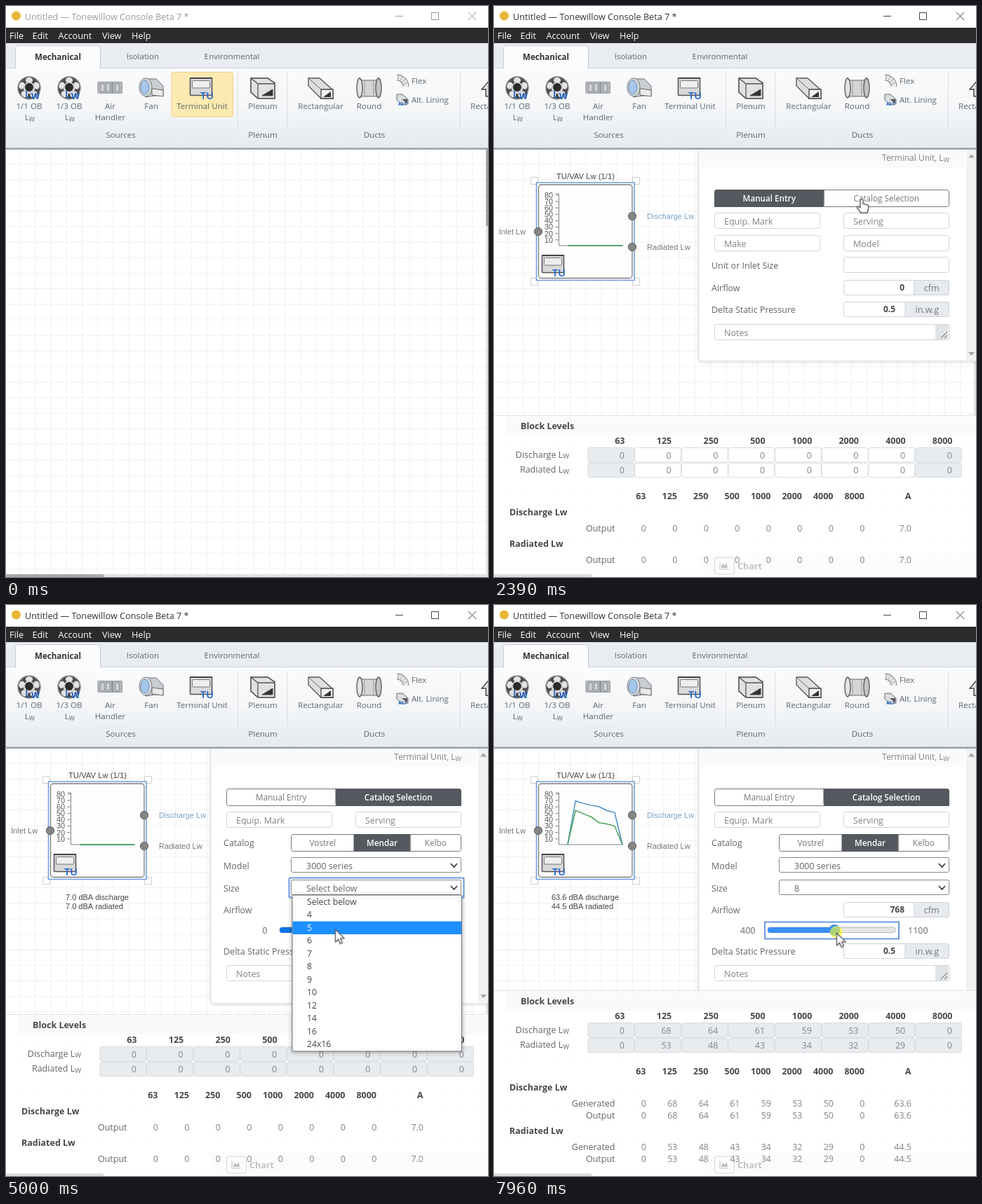
These frames come from a looping animation (687 px wide and 815 px high, 8000 ms). An HTML page with a canvas:

```html
<!DOCTYPE html>
<html lang="en">
<head>
<meta charset="utf-8">
<title>Terminal unit selection</title>
<style>
html, body { margin: 0; width: 687px; height: 815px; overflow: hidden; background: #fff; }
canvas { display: block; }
</style>
</head>
<body>
<canvas id="stage" width="687" height="815"></canvas>
<script>
const g = document.getElementById('stage').getContext('2d');
const LOOP = 8000;
const UI = '"Open Sans", "Noto Sans", sans-serif';
const ARIAL = '"Liberation Sans", sans-serif';
const DARK = '#54595f', BLUE = '#0b74e5', RING = '#6b98e0', LABEL = '#60666b';
const BANDS = [63, 125, 250, 500, 1000, 2000, 4000, 8000];
const MODELS = ['Select below', '3000 series', '3001 series', '3100 series', '3200 series', '3400 series',
  '3500 series', '3600 series', '3700 series', '3800 series', '3900 series', '30X series', '31X series'];
const SIZES = ['Select below', '4', '5', '6', '7', '8', '9', '10', '12', '14', '16', '24x16'];
const LEVELS = { discharge: [68, 64, 61, 59, 53, 50], radiated: [53, 48, 43, 34, 32, 29] };

const CURSOR = [[70, 257, 136], [550, 143, 247], [760, 86, 272], [1770, 86, 272], [2380, 524, 276],
  [2600, 524, 276], [2930, 532, 338], [3040, 532, 338], [3340, 482, 370], [3650, 482, 370],
  [4170, 478, 407], [4310, 477, 403], [4380, 478, 404], [4580, 478, 404], [5000, 469, 462],
  [5340, 467, 485], [5640, 450, 514], [5760, 450, 514], [6170, 419, 463], [6240, 419, 463],
  [6560, 415, 463], [6880, 415, 463], [7960, 488, 467]];
const PRESSES = [[70, 1020], [1770, 1860], [2600, 2740], [2970, 3090], [3550, 3660],
  [4140, 4290], [4580, 4690], [5700, 5800], [6840, LOOP]];

const clamp = v => Math.max(0, Math.min(1, v));
const smooth = v => { v = clamp(v); return v * v * (3 - 2 * v); };
const glide = v => (clamp(v) + smooth(v)) / 2;
const within = (t, a, b) => t >= a && t < b;

function follow(keys, t) {
  if (t <= keys[0][0]) return keys[0].slice(1);
  for (let i = 1; i < keys.length; i++) {
    const [t0, x0, y0] = keys[i - 1], [t1, x1, y1] = keys[i];
    if (t <= t1) {
      const e = glide((t - t0) / (t1 - t0));
      return [x0 + (x1 - x0) * e, y0 + (y1 - y0) * e];
    }
  }
  return keys[keys.length - 1].slice(1);
}

// y is the middle of the capital letters
function text(s, x, y, { size = 12.5, color = LABEL, weight = 400, align = 'left', font = UI } = {}) {
  g.font = `${weight} ${size}px ${font}`;
  g.textAlign = align;
  g.fillStyle = color;
  g.fillText(s, x, y + size * 0.36);
  return g.measureText(s).width;
}

function box(x, y, w, h, fill, stroke, r = 0, line = 1) {
  g.beginPath();
  g.roundRect(x, y, w, h, r);
  paint(fill, stroke, line);
}

function paint(fill, stroke, line = 1) {
  if (fill) { g.fillStyle = fill; g.fill(); }
  if (stroke) { g.strokeStyle = stroke; g.lineWidth = line; g.stroke(); }
}

function poly(points, fill, stroke, line = 1, closed = true) {
  g.beginPath();
  points.forEach(([x, y]) => g.lineTo(x, y));
  if (closed) g.closePath();
  paint(fill, stroke, line);
}

function oval(x, y, rx, ry, fill, stroke, line = 1) {
  g.beginPath();
  g.ellipse(x, y, rx, ry, 0, 0, Math.PI * 2);
  paint(fill, stroke, line);
}

const rule = (x0, y0, x1, y1, color, line = 1) => poly([[x0, y0], [x1, y1]], null, color, line, false);

function at(x, y, draw, alpha = 1) {
  g.save();
  g.translate(x, y);
  g.globalAlpha *= alpha;
  draw();
  g.restore();
}

function shadowed(color, blur, dy, draw) {
  g.save();
  g.shadowColor = color;
  g.shadowBlur = blur;
  g.shadowOffsetY = dy;
  draw();
  g.restore();
}

function subW(prefix, right, y, size, color) {
  const w = text('W', right, y + 2.5, { size: size * 0.76, color, align: 'right' });
  text(prefix, right - w, y, { size, color, align: 'right' });
}

function unitIcon(x, y) {
  at(x, y, () => {
    box(1.5, 1, 31, 24.5, '#d8dadc', '#555', 1, 1.6);
    box(4.5, 4.5, 25, 10.5, '#eceef0', '#777', 1);
    rule(1, 1, 33, 1, '#444', 2);
    text('TU', 16, 25.5, { size: 14.5, color: '#1c60c6', weight: 600 });
  });
}

function fanIcon(x) {
  at(x, 117, () => {
    oval(0, 0, 16, 16, '#4c4c4c', '#8b8b8b', 1.5);
    for (let i = 0; i < 5; i++) {
      g.rotate(Math.PI * 0.4);
      oval(0, -11, 5.2, 4, '#e4e4e4');
    }
    oval(0, 0, 8.5, 8.5, '#d4d4d4');
    oval(0, -1, 6, 6, '#2a2a2a');
  });
  text('L', x - 6, 126, { size: 14, color: '#1c60c6', weight: 600 });
  text('W', x + 3, 128, { size: 12.5, color: '#1c60c6', weight: 700 });
}

function ductIcons() {
  box(131, 108.5, 34.5, 16, '#b4b7ba', '#96999c', 1);
  [135, 143, 156].forEach(x => box(x, 111, 5, 11, '#d2d4d6', '#85878a', 0, 0.8));
  box(150, 109, 3, 15, '#96999c');

  poly([[199, 104], [214, 104], [224, 114], [224, 128], [212, 128], [199, 130]], '#c9ccd0', '#70757a');
  poly([[208, 118], [224, 120], [224, 129], [208, 127]], '#e9ebed', '#666');
  oval(199, 116, 9, 13, '#d8dde2', '#777');
  oval(198, 116, 6, 10, '#a5c6e8', '#6d90b5');

  poly([[349, 103], [373, 103], [383, 110], [383, 132], [359, 132], [349, 123]], '#dfe1e3', '#444', 1.5);
  poly([[349, 103], [359, 111], [383, 111], [359, 111], [359, 132]], null, '#555', 1.3, false);
  poly([[365, 128], [380, 119], [380, 128]], '#333', '#444');

  poly([[431, 103], [447, 103], [466, 120], [466, 132], [449, 132], [431, 114]], '#dcdee0', '#555', 1.3);
  box(449, 119, 17, 13, '#f1f2f3', '#444', 0, 1.3);
  rule(449, 119, 431, 103, '#666');
  poly([[452, 130], [463, 122], [463, 130]], '#333');

  box(503, 106, 29, 23, '#d3d5d7', '#666', 1);
  oval(504, 117, 4, 14, '#e2e4e6', '#555', 1.3);
  oval(531, 117, 4, 14, '#c3c5c8', '#555', 1.3);
  rule(511, 106, 511, 129, '#999');
  rule(524, 106, 524, 129, '#999');

  g.beginPath();
  g.arc(557, 115, 13, -Math.PI / 2, 0);
  paint(null, '#777', 9);
  paint(null, '#e4e6e8', 7);
  for (let a = -1.4; a < 0; a += 0.35)
    rule(557 + 9 * Math.cos(a), 115 + 9 * Math.sin(a), 557 + 17 * Math.cos(a), 115 + 17 * Math.sin(a), '#999', 0.8);

  poly([[557, 126], [565, 126], [573, 133], [573, 140], [563, 140], [557, 134]], '#dcdee0', '#666');
  poly([[564, 133], [572, 133], [572, 139]], '#555');
  text('ALT', 559, 139, { size: 7, color: '#1c60c6', weight: 700 });

  poly([[690, 105], [678, 119], [684, 119], [684, 129], [690, 129]], '#dcdee0', '#444', 1.4);
}

function chrome(t) {
  box(0, 0, 687, 31, '#fff');
  const active = t >= 70;
  oval(14.5, 14, 6.5, 6.5, '#e8b637');
  text('Untitled — Tonewillow Console Beta 7 *', 27, 15, { size: 12.7, color: active ? '#333' : '#999' });
  const ink = active ? '#444' : '#999';
  rule(555, 14.5, 566, 14.5, ink);
  box(606.5, 9.5, 10, 10, null, ink);
  rule(659, 9, 670, 20, ink);
  rule(670, 9, 659, 20, ink);

  box(0, 31, 687, 22, '#2b2b2b');
  [['File', 5], ['Edit', 37.5], ['Account', 74.5], ['View', 137], ['Help', 179]]
    .forEach(([s, x]) => text(s, x, 42, { size: 12.7, color: '#fff' }));

  box(0, 53, 687, 36, '#e9edf2');
  const shade = g.createLinearGradient(0, 88, 0, 203);
  shade.addColorStop(0, '#fafbfc');
  shade.addColorStop(0.5, '#f4f6f8');
  shade.addColorStop(1, '#e6eaee');
  box(0, 88, 687, 115, shade);
  rule(0, 88.5, 687, 88.5, '#cfd4da');
  box(13.5, 56.5, 121, 33, '#fbfcfd', '#c6cbd1', [4, 4, 0, 0]);
  box(14, 87, 120, 4, '#fafbfc');
  const small = { size: 11.6, align: 'center' };
  text('Mechanical', 74, 73, { ...small, weight: 700, color: '#333' });
  text('Isolation', 195, 72, small);
  text('Environmental', 322, 72, small);

  if (t < 1020) box(236, 94.5, 87.5, 63.5, active ? '#f0c340' : '#fdeab0', active ? '#e2b433' : '#ecd28a', 3);
  [330.5, 400.5, 647.5].forEach(x => rule(x, 94, x, 175, '#d9dde1'));
  fanIcon(33);
  fanIcon(90);
  unitIcon(261, 102);
  ductIcons();
  [['1/1 OB', 33], ['1/3 OB', 90], ['Air', 148.5], ['Fan', 207], ['Terminal Unit', 279.5],
    ['Plenum', 366], ['Rectangular', 448.5], ['Round', 517.5]].forEach(([s, x]) => text(s, x, 143, small));
  text('Handler', 148.5, 159, small);
  subW('L', 41, 159, 11.6, LABEL);
  subW('L', 98, 159, 11.6, LABEL);
  text('Flex', 578, 107, { size: 11.6 });
  text('Alt. Lining', 578, 134, { size: 11.6 });
  text('Rectangular', 662, 143, { size: 11.6 });
  [['Sources', 163.5], ['Plenum', 366], ['Ducts', 525]].forEach(([s, x]) => text(s, x, 184, small));
  box(0, 202.5, 687, 2.5, '#9aa2aa');
}

function workspace() {
  box(0, 203, 687, 612, '#fff');
  for (let x = 19.5; x < 687; x += 22.25) rule(x, 205, x, 811, '#f1f1f1');
  for (let y = 226; y < 811; y += 22.2) rule(0, y, 684, y, '#f1f1f1');
  box(684, 205, 3, 610, '#e2e2e2');
  box(684, 205, 3, 109, '#a3a3a3');
  box(0, 811, 687, 4, '#e2e2e2');
  box(0, 811, 139, 4, '#a9a9a9');
}

function curve(values, color) {
  const points = values.map((v, i) => [105 + i * 11.15, 342 - v * 0.92]);
  poly(points, null, color, 1.5, false);
}

function block(t, data) {
  const plain = { font: ARIAL, size: 11.1, color: '#555' };
  if (t >= 1770) {
    for (const x of [52.5, 197.5]) for (const y of [244.5, 388.5]) box(x, y, 10, 10, '#fff', '#cfcfcf');
    box(60.5, 252, 139.5, 139.5, '#fff', '#6f9ee0', 0, 1.6);
  }
  box(63.5, 255, 133.5, 133.5, '#fdfdfd', '#7d7d7d', 4, 1.3);
  text('TU/VAV Lw (1/1)', 130.5, 243, { ...plain, align: 'center', color: '#444', size: 11.3 });
  for (let v = 10; v <= 80; v += 10) {
    const y = 343 - v * 0.915;
    text(v, 84, y, { ...plain, align: 'right', size: 10.8 });
    rule(87, y, 92, y, '#888');
  }
  poly([[88, 268], [92.5, 268], [92.5, 342], [184, 342]], null, '#888', 1, false);
  curve(data.discharge, '#4a90c4');
  curve(data.radiated, '#4ca358');
  unitIcon(67, 355);
  [[63, 322], [197, 300], [197, 344]].forEach(([x, y]) => oval(x, y, 5.7, 5.7, '#858585', '#666'));
  text('Inlet Lw', 7, 322, { ...plain, color: '#777' });
  text('Discharge Lw', 218, 300, { ...plain, color: '#76a3c9' });
  text('Radiated Lw', 218, 344, { ...plain, color: '#777' });
  if (t >= 2670) {
    const note = { font: ARIAL, size: 11, color: '#444', align: 'center' };
    text(`${data.dA.toFixed(1)} dBA discharge`, 130, 417.5, note);
    text(`${data.rA.toFixed(1)} dBA radiated`, 126, 430.5, note);
  }
}

function segments(edges, names, chosen, y, h) {
  const left = edges[0], right = edges[edges.length - 1];
  box(left, y, right - left, h, '#fff', '#777', 3);
  names.forEach((name, i) => {
    const x = edges[i], w = edges[i + 1] - x, on = i === chosen;
    if (on) box(x, y, w, h, DARK, DARK, [i ? 0 : 3, i === names.length - 1 ? 3 : 0]);
    else if (i) rule(x, y, x, y + h, '#777');
    text(name, x + w / 2, y + h / 2, { size: 11.7, weight: on ? 600 : 400, color: on ? '#fff' : '#777', align: 'center' });
  });
}

function field(x, y, w, hint = '') {
  box(x + 0.5, y + 0.5, w, 22, '#fff', '#d0d4d8', 3);
  text(hint, x + 14, y + 12, { color: '#7d8388' });
}

function measure(label, value, unit, y, split, enabled = true) {
  text(label, 310, y);
  box(498.5, y - 10.5, 150, 21, enabled ? '#fff' : '#e8ebee', '#cfd3d8', 3);
  box(split, y - 10.5, 648.5 - split, 21, '#e7eaee', '#cfd3d8', [0, 3, 3, 0]);
  text(value, split - 14, y, { weight: 700, color: '#444', align: 'right', size: 12 });
  text(unit, (split + 648.5) / 2, y, { align: 'center', color: '#777' });
}

function notes(y) {
  field(314, y - 12, 335, 'Notes');
  box(629, y - 11, 19, 21, '#e1e4e7');
  rule(637, y + 8, 646, y - 1, '#555');
  rule(642, y + 8, 646, y + 4, '#555');
}

function select(label, value, y, enabled, focused) {
  text(label, 310, y);
  if (focused) box(403.5, y - 14.5, 249, 28, '#fff', RING, 1, 2);
  box(406.5, y - 11.5, 242, 21, '#fff', enabled ? '#888' : '#d5d8db', 2);
  text(value, 428, y, { color: enabled ? '#666' : '#999' });
  poly([[634, y - 3], [638.5, y + 2], [643, y - 3]], null, enabled ? '#333' : '#aaa', 1.7, false);
}

function slider(t, s) {
  const ranged = t >= 5760, dragging = t >= 6840;
  text(ranged ? '400' : '0', 372.5, 464, { align: 'right' });
  text(ranged ? '1100' : '5000', 590, 464);
  if (dragging) box(386, 452.5, 191, 24, '#fff', RING, 0, 2);
  const color = dragging ? '#3a8ff2' : t >= 6240 ? '#0a5dc2' : BLUE;
  box(390, 460, 182.5, 7.5, '#e6e6e6', '#b5b5b5', 4);
  box(390, 460, s.thumb - 390, 8, dragging ? color : BLUE, null, 4);
  oval(s.thumb, 464, 8, 8, color);
}

function panel(t, s) {
  const catalog = t >= 2670, bottom = catalog ? 569 : 507;
  shadowed('rgba(0,0,0,.12)', 4, 1, () => box(291.5, 205, 400, bottom - 205, '#fff', '#dcdfe2', [0, 0, 0, 6]));
  box(292, 205, 380, 26, '#fafafa');
  box(673, 205, 14, bottom - 206, '#f1f1f1');
  poly([[676, 216.5], [680.5, 211.5], [685, 216.5]], '#a3a3a3');
  poly([[676, bottom - 13], [680.5, bottom - 8], [685, bottom - 13]], '#a3a3a3');
  subW('Terminal Unit, L', 649, 217, 12, '#7c8287');

  segments([314.5, 470, 648.5], ['Manual Entry', 'Catalog Selection'], catalog ? 1 : 0, 262.5, 24);
  field(314, 295, 150, 'Equip. Mark');
  field(498, 295, 150, 'Serving');
  if (!catalog) {
    field(314, 327, 150, 'Make');
    field(498, 327, 150, 'Model');
    text('Unit or Inlet Size', 310, 370);
    field(498, 358, 150);
    measure('Airflow', '0', 'cfm', 402, 599);
    measure('Delta Static Pressure', '0.5', 'in.w.g', 433, 586);
    notes(466);
    return;
  }
  text('Catalog', 310, 339);
  segments([406.5, 496, 576, 648.5], ['Vostrel', 'Mendar', 'Kelbo'], t >= 3000 ? 1 : 0, 327.5, 24);
  const modelled = t >= 4240, sized = t >= 5760;
  select('Model', modelled ? '3000 series' : 'Select below', 372, true, within(t, 3550, 4580));
  select('Size', sized ? '8' : 'Select below', 404, modelled, within(t, 4580, 6840));
  measure('Airflow', s.flow, 'cfm', 435, 599, sized);
  slider(t, s);
  measure('Delta Static Pressure', '0.5', 'in.w.g', 494, 586);
  notes(526);
}

function levelsPanel(t, data) {
  const live = data.live, top = live ? 550 : 584;
  box(0, top, 687, 815 - top, 'rgba(255,255,255,.94)');
  rule(0, top + 0.5, 687, top + 0.5, '#e3e3e3');
  box(16, top + 2, 671, 27, 'rgba(247,247,247,.6)');
  const bold = { weight: 700, color: '#44484c', align: 'right' };
  const num = { color: '#7f8489', align: 'right' };
  text('Block Levels', 38, top + 15, { ...bold, align: 'left' });
  [['Discharge L', data.discharge], ['Radiated L', data.radiated]].forEach(([name, row], r) => {
    const y = top + 57 + r * 21.7;
    subW(name, 107, y - 1, 12.5, LABEL);
    row.forEach((v, i) => {
      const x = 134 + i * 66.65, off = t >= 2670 || i % 7 === 0;
      box(x, y - 10.5, 66, 20.5, off ? '#e9ecef' : '#fff', '#d6dadd', 3);
      text(v, 186 + i * 66.7, y, num);
    });
  });
  BANDS.forEach((b, i) => {
    text(b, 186.5 + i * 66.7, top + 36, bold);
    text(b, 216.5 + i * 44.5, top + 115.5, bold);
  });
  text('A', 594.5, top + 115.5, bold);

  // The chart button lies beneath the table's last row
  box(291, 781, 396, 30, 'rgba(0,0,0,.012)');
  at(0, 0, () => {
    box(314.5, 787, 28, 24, null, '#aaa', 4);
    poly([[322, 794], [322, 804], [334, 804]], null, '#888', 1, false);
    poly([[324, 802], [324, 799], [327, 796], [329, 799], [332, 795], [333, 802]], '#888');
    text('Chart', 347, 799, { weight: 700, color: '#888' });
  }, 0.5);

  const row = (name, values, total, y) => {
    text(name, 172.5, y, { align: 'right' });
    values.forEach((v, i) => text(v, 217 + i * 44.5, y, num));
    text(total.toFixed(1), 595, y, num);
  };
  const group = (name, values, total, y) => {
    text(name, 22, y, { ...bold, align: 'left' });
    if (live) row('Generated', values, total, y + 23);
    row('Output', values, total, y + (live ? 40.5 : 23));
  };
  group('Discharge Lw', data.discharge, data.dA, top + 138);
  group('Radiated Lw', data.radiated, data.rA, top + (live ? 200 : 183));
  box(0, 811, 139, 4, '#dedede');
}

function list(items, x, y, w, hover) {
  shadowed('rgba(0,0,0,.3)', 6, 1, () => box(x, y, w, items.length * 18.5 + 1, '#fff', '#777'));
  items.forEach((item, i) => {
    const on = i === hover;
    if (on) box(x + 0.5, y + i * 18.5 + 0.5, w - 1, 18.5, '#1e90ff');
    text(item, 429, y + 9.5 + i * 18.5, { size: 12.2, color: on ? '#fff' : '#444' });
  });
}

// A see-through sheet whose shadow falls only outside its edges
function emergingList(x, y, w, h) {
  box(x, y, w, h, 'rgba(255,255,255,.12)');
  g.save();
  g.beginPath();
  g.rect(0, 0, 687, 815);
  g.rect(x, y, w, h);
  g.clip('evenodd');
  shadowed('rgba(0,0,0,.4)', 7, 1, () => box(x, y, w, h, '#fff'));
  g.restore();
}

function lists(t, y) {
  const hover = top => Math.max(0, Math.floor((y - top) / 18.5));
  if (within(t, 3550, 3620)) emergingList(406, 382, 266, 242);
  else if (within(t, 3620, 4240)) list(MODELS, 408, 382, 262, hover(382));
  if (within(t, 4620, 5760)) list(SIZES, 408, 414, 241.5, hover(414));
}

function pointer(t, x, y) {
  if (PRESSES.some(([a, b]) => within(t, a, b))) oval(x, y, 9, 9, 'rgba(255,255,40,.6)');
  if (t < 1020) return;
  const hand = within(t, 2300, 2640) || within(t, 2880, 3130);
  at(x, y, () => shadowed('rgba(0,0,0,.3)', 2, 1, () => {
    if (hand) {
      g.beginPath();
      g.moveTo(-2, 12);
      g.lineTo(-2, 1);
      g.quadraticCurveTo(0, -3, 2, 1);
      g.lineTo(2, 6);
      g.lineTo(9, 8);
      g.quadraticCurveTo(11, 10, 9, 15);
      g.lineTo(8, 19);
      g.lineTo(-1, 19);
      g.lineTo(-7, 11);
      g.quadraticCurveTo(-6, 8, -2, 12);
      paint('#fff', '#555', 1.1);
    } else {
      poly([[0.5, 1], [0.5, 18.5], [4.7, 15], [7.3, 21], [10.3, 19.6], [7.8, 13.7], [13, 13.4]], '#fff', '#666', 1.1);
    }
  }));
}

function ghost(x, y) {
  at(x - 19, y - 42, () => {
    shadowed('rgba(0,0,0,.28)', 20, 8, () => box(0.5, 0.5, 90.5, 90.5, '#fff', '#555', 4));
    unitIcon(28, 30);
  });
}

function state(t) {
  const live = t >= 6910;
  const thumb = 415 + 70.3 * glide((t - 6880) / 1080);
  const flow = live ? Math.round(400 + 700 * (thumb - 398) / 166) : 0;
  const shift = live ? 30 * Math.log10(flow / 768) : 0;
  const spectrum = row => [0, ...row.map(v => live ? Math.round(v + shift) : 0), 0];
  return {
    live, thumb, flow,
    discharge: spectrum(LEVELS.discharge),
    radiated: spectrum(LEVELS.radiated),
    dA: live ? 63.6 + shift : 7,
    rA: live ? 44.5 + shift : 7
  };
}

function render(t) {
  const s = state(t), [x, y] = follow(CURSOR, t);
  g.clearRect(0, 0, 687, 815);
  workspace();
  if (t >= 1020) block(t, s);
  if (t >= 1770) {
    const shown = smooth((t - 1750) / 230);
    at(0, 0, () => panel(t, s), shown);
    at(0, 0, () => levelsPanel(t, s), shown);
  }
  chrome(t);
  lists(t, y);
  if (within(t, 70, 1020)) ghost(x, y);
  pointer(t, x, y);
}

const start = performance.now();
function tick() {
  render((performance.now() - start) % LOOP);
  requestAnimationFrame(tick);
}
tick();
</script>
</body>
</html>
```
